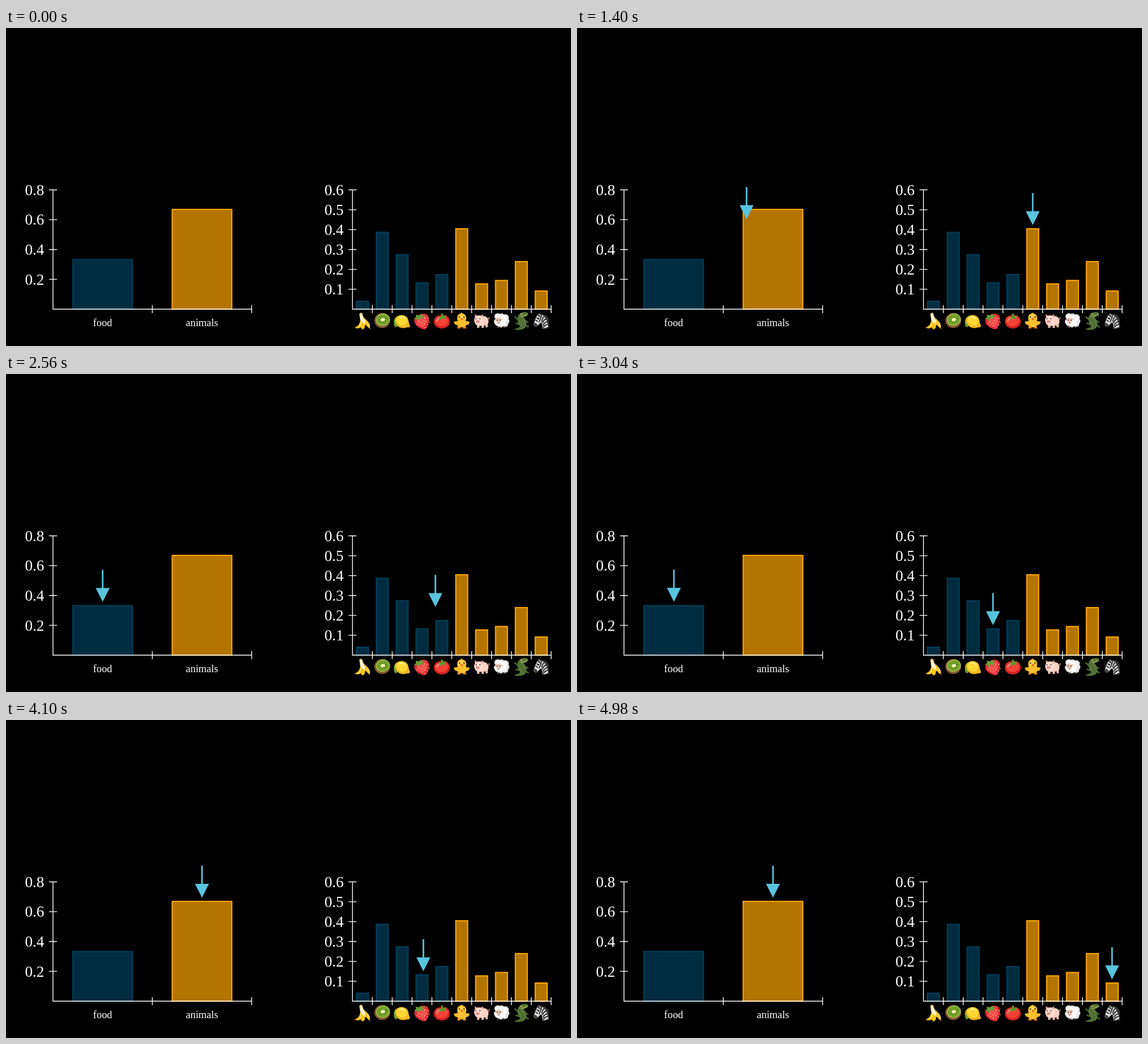
Write an HTML page that moves like this. It is 998 px wide and 561 px high and loops after 5 s.

```html
<!DOCTYPE html>
<html lang="en">
<head>
<meta charset="utf-8">
<title>Two-level sampling</title>
<style>
  html, body { margin: 0; height: 100%; overflow: hidden; background: #000; }
  svg { display: block; width: 100%; height: 100%; }
  text { font-family: "Liberation Serif", serif; fill: #fff; }
  .num { font-size: 27.3px; text-anchor: end; }
  .name { font-size: 18.4px; text-anchor: middle; }
  .axis { stroke: #fff; stroke-width: 1.4; fill: none; }
  .bar { fill-opacity: .7; stroke-width: 2.1; }
  .arrow { fill: #58c4dd; }
</style>
</head>
<body>
<svg id="stage" viewBox="0 0 998 561">
  <g id="charts"></g>
  <g id="icons">
    <g><!-- banana -->
      <path fill="#fff3c4" d="M-5-13Q-3-16 0-13Q1-5 9 3L2 10Q-5 1-5-13Z"/>
      <path fill="#f3d58b" d="M-5-13Q-3-16 0-13L-1-10Q-3-12-5-10Z"/>
      <path fill="#fcc21b" d="M-4-2C-4 6-9 10-14 11Q-9 15-3 11Q-1 15 0 15Q6 13 4 5Q8 9 13 14Q15 5 8-1Q4-5 2-7Q7 1 4 5Q-1 3-4-2Z"/>
      <path fill="none" stroke="#ffe36c" stroke-width="2" d="M-3 2Q-3 8-7 11M8 2Q11 5 12 9"/>
      <path stroke="#694b27" stroke-width="2" d="M-14 11l2 1M12 12l2 2M-1 14l2 1"/>
    </g>
    <g><!-- kiwi -->
      <ellipse cy="-1" rx="14" ry="13.2" fill="#825a36"/>
      <g transform="translate(1 -2.5) rotate(-15)">
        <ellipse rx="12.3" ry="10.6" fill="#b5cf4e"/>
        <ellipse rx="11" ry="9.3" fill="#689f24"/>
        <ellipse rx="8" ry="6.6" fill="#91bd35"/>
        <ellipse rx="5.8" ry="4.5" fill="none" stroke="#263414" stroke-width="2.6" stroke-dasharray="1.2 2.1"/>
        <ellipse rx="4" ry="2.8" fill="#eff2b0"/>
      </g>
    </g>
    <g><!-- lemon -->
      <path fill="#689f38" d="M-8-9Q-17-5-14 8Q-13 11-10 11Q-4 3-8-9Z"/>
      <path fill="#f2b61e" d="M-12-4C-8-12 3-13 9-6C12-2 11 4 14 8Q13 12 9 11C2 14-7 12-10 6Q-14 0-12-4Z"/>
      <path fill="#fdd835" d="M-10-4C-6-11 3-11 8-5C10 1 9 5 4 8C-2 9-6 7-8 4Q-11 0-10-4Z"/>
      <path fill="none" stroke="#fff59d" stroke-width="2" stroke-linecap="round" d="M-5-6Q-1-9 4-5"/>
    </g>
    <g transform="rotate(-15)"><!-- strawberry -->
      <path fill="#e32b36" d="M-12-6C-6-13 7-15 12-8C16-1 9 11 3 15Q0 16-4 13C-11 8-16 1-12-6Z"/>
      <path fill="#f44b4e" d="M-9-3C-3-8 6-10 9-5C11 1 5 8 1 11C-5 9-11 3-9-3Z"/>
      <path fill="#689f38" d="M-13-7L-8-10L-8-14L-3-11L3-13L2-10L9-9L3-7L2-3L-3-6L-8-1L-8-6Z"/>
      <path stroke="#ffd27a" stroke-width="1.6" stroke-linecap="round" stroke-dasharray=".2 5" d="M-10 2L4 14M-5 0L8 9M3 0L12 6M6-4L13-1"/>
    </g>
    <g><!-- tomato -->
      <path fill="#d92323" d="M-14 1C-14-8-7-11 0-10C8-12 14-6 14 1C14 9 7 13 0 13S-14 9-14 1Z"/>
      <path fill="#f44336" d="M-12 0C-11-7-5-9 1-8C8-9 12-4 11 1C9 7 4 9-1 9S-11 6-12 0Z"/>
      <path fill="none" stroke="#ff8a80" stroke-width="2.4" stroke-linecap="round" d="M-9 0Q-8-4-5-5"/>
      <path fill="#5b9a2c" d="M-1-8L-2-13L2-13L2-9L9-10L5-6L7-2L1-5L-4-1L-4-6L-9-7Z"/>
    </g>
    <g><!-- chick -->
      <path fill="#f28b1d" d="M-7 9h4l1 4h-6zM3 9h4l1 4h-6z"/>
      <path fill="#fbc02d" d="M-3-13L0-15L2-13Q8-12 8-5Q8-2 7 0L14 1Q13 7 8 7Q6 11 0 11T-8 7Q-13 7-14 1L-7 0Q-8-2-8-5Q-8-12-3-13Z"/>
      <ellipse cx="-1" cy="-6" rx="5" ry="5" fill="#ffd54f"/>
      <path fill="none" stroke="#f5a623" d="M-9 2Q-8 4-6 4M9 2Q8 4 6 4"/>
      <circle cx="-4" cy="-7" r="1.3" fill="#40331f"/><circle cx="4" cy="-7" r="1.3" fill="#40331f"/>
      <path fill="#ef6c1a" d="M-3-4L0-6L3-4L0-1Z"/>
    </g>
    <g><!-- pig -->
      <path fill="#eebbad" d="M-8 4h4v8h-4zM0 5h4v7h-4zM7 2h4v9h-4z"/>
      <path fill="#fad0c3" d="M-10-8Q0-12 9-7Q13-4 12 3Q10 8 4 8L-6 9Q-13 6-13-2Z"/>
      <path fill="none" stroke="#e5a195" stroke-width="1.5" d="M11-3q3 0 2-4"/>
      <ellipse cx="-5" cy="-2" rx="8" ry="8" fill="#ffdcd0"/>
      <path fill="#f0a79c" d="M-12-6L-12-12L-7-9ZM-2-9L3-12L2-5Z"/>
      <ellipse cx="-7" cy="1" rx="3.8" ry="2.7" fill="#f0a79c"/>
      <circle cx="-10" cy="-4" r="1.1" fill="#453330"/><circle cx="-3" cy="-4" r="1.1" fill="#453330"/>
      <circle cx="-8.5" cy="1" r=".8" fill="#9b4d46"/><circle cx="-5.5" cy="1" r=".8" fill="#9b4d46"/>
    </g>
    <g><!-- sheep -->
      <path stroke="#7a5e52" stroke-width="2.6" d="M-6 6v6M-1 6v6M5 6v6M9 5v5"/>
      <g fill="#e3e3e3">
        <circle cx="0" cy="-7" r="6.5"/><circle cx="7" cy="-6" r="6"/><circle cx="9" cy="0" r="5"/>
        <circle cx="7" cy="5" r="5"/><circle cx="-1" cy="5" r="6"/><circle cx="-7" cy="-8" r="5.5"/>
        <circle cx="-9" cy="1" r="4.5"/>
      </g>
      <g fill="#fafafa">
        <circle cx="3" cy="-4" r="7"/><circle cx="-6" cy="-9" r="4.5"/><circle cx="2" cy="3" r="6"/><circle cx="-7" cy="4" r="4.5"/>
      </g>
      <path fill="#e7c4b2" d="M-9-5Q-5-7-1-5L3-3L-1-1Q-2 5-5 5T-9-1L-12-2Z"/>
      <circle cx="-7.5" cy="-1.5" r="1" fill="#33302f"/><circle cx="-2.5" cy="-1.5" r="1" fill="#33302f"/>
      <path stroke="#8c675e" d="M-6 3h2"/>
    </g>
    <g><!-- crocodile -->
      <path fill="none" stroke="#40602a" stroke-width="3" stroke-linecap="round" d="M-6-3L-11-7M5-2L11 2M-3 6L-9 4M7 7L12 10"/>
      <path fill="#56753a" d="M-6-9Q-3-15 5-16Q13-16 12-12Q11-9 4-7Q8-2 9 5Q9 13 0 15Q-8 17-13 14Q-5 13-2 9Q-6 4-7-2Z"/>
      <path fill="none" stroke="#365426" stroke-width="1.7" stroke-dasharray="1.5 2" d="M-3-6Q0 0 4 5Q4 11-6 13"/>
      <path fill="none" stroke="#9daf59" stroke-width="1.6" d="M11-12Q4-8-1-8"/>
      <circle cx="0" cy="-12" r="1.7" fill="#e4cf5b"/><circle cx="0" cy="-12" r=".8" fill="#222"/>
    </g>
    <g><!-- zebra -->
      <path fill="#3a3a3a" d="M-7-10L-4-14L0-12Q9-13 13-4L14 12L7 13Z"/>
      <path fill="#dedede" d="M-7-10Q-2-14 3-10Q9-5 11 4L13 12L2 13Q3 8 0 2Q-4 5-7 9Q-13 11-13 5Q-11-4-7-10Z"/>
      <path fill="none" stroke="#303030" stroke-width="1.9" d="M-6-10L-1-7M-8-6L-4-3M-10-2L-6 1M1-11L-1-4L-4 2M5-8Q2-5 1 1M9-4Q4-2 2 4M11 1Q6 2 3 8M12 6Q7 6 3 12M13 11L8 13"/>
      <path fill="#454545" d="M-12 3Q-8 3-6 8Q-9 12-13 8Z"/>
      <path fill="#ddd" stroke="#333" d="M-4-10L-5-14L0-11Z"/>
      <circle cx="-5" cy="-4.5" r="1.3" fill="#111"/>
    </g>
  </g>
  <path id="left" class="arrow"/>
  <path id="right" class="arrow"/>
</svg>
<script>
const FLOOR = 496, HEIGHT = 210.5, WIDTH = 350.9;
const BLUE = '#003f5c', GOLD = '#ffa600';
const byId = id => document.getElementById(id);

function add(tag, attrs, label = '') {
  const el = document.createElementNS('http://www.w3.org/2000/svg', tag);
  for (const k in attrs) el.setAttribute(k, attrs[k]);
  el.textContent = label;
  byId('charts').append(el);
}

// Draws one chart and returns the top centre of each bar.
function chart(x0, ticks, tickValue, tops) {
  const step = WIDTH / tops.length;
  const points = tops.map((y, i) => ({ x: x0 + step * (i + .5), y }));
  points.forEach(({ x, y }, i) => {
    const color = i < tops.length / 2 ? BLUE : GOLD;
    add('rect', { class: 'bar', x: x - step * .3, y, width: step * .6, height: FLOOR - y, fill: color, stroke: color });
  });
  let d = `M${x0} ${FLOOR - HEIGHT - .7}V${FLOOR}H${x0 + WIDTH + .7}`;
  for (let i = 1; i <= ticks; i++) {
    const y = FLOOR - HEIGHT * i / ticks;
    d += `M${x0 - 7} ${y}h14`;
    add('text', { class: 'num', x: x0 - 15.5, y: y + 9.3 }, (i * tickValue).toFixed(1));
  }
  for (let i = 1; i <= tops.length; i++) d += `M${x0 + step * i} ${FLOOR - 7}v14`;
  add('path', { class: 'axis', d });
  return points;
}

const groups = chart(83, 4, .2, [408.5, 320]);
const items = chart(612, 6, .1, [482, 360.5, 400.2, 449.5, 435, 354.2, 451.4, 445.4, 412.1, 464]);

['food', 'animals'].forEach((name, i) =>
  add('text', { class: 'name', x: groups[i].x, y: 526 }, name));
[...byId('icons').children].forEach((icon, i) => {
  const turn = icon.getAttribute('transform') || '';
  icon.setAttribute('transform', `translate(${items[i].x} 517) ${turn}`);
});

const sigmoid = x => 1 / (1 + Math.exp(-x));
const edge = sigmoid(-5);
function smooth(t) {
  t = Math.min(1, Math.max(0, t));
  return (sigmoid(10 * t - 5) - edge) / (1 - 2 * edge);
}

const mix = (a, b, k) => ({ x: a.x + (b.x - a.x) * k, y: a.y + (b.y - a.y) * k });

function place(id, { x, y }) {
  byId(id).setAttribute('d',
    `M${x - 1.4} ${y - 63}h2.8v32h10.9L${x} ${y - 6.4}L${x - 12.3} ${y - 31}h10.9Z`);
}

function draw(now) {
  // 60 steps per second, shown on a 20 ms grid
  const t = Math.round(Math.floor(now % 5000 / 20) * 1.2) / 60;
  const [food, animals] = groups;
  const chick = items[5], berry = items[3], zebra = items[9];
  place('left', t < 3 ? mix(animals, food, smooth(t - 1)) : mix(food, animals, smooth(t - 3)));
  place('right', t < 4 ? mix(chick, berry, smooth(t - 2)) : mix(berry, zebra, smooth(t - 4)));
  for (const id of ['left', 'right']) byId(id).style.display = t < 1 ? 'none' : '';
}

function tick() {
  draw(performance.now());
  requestAnimationFrame(tick);
}
tick();
</script>
</body>
</html>
```
